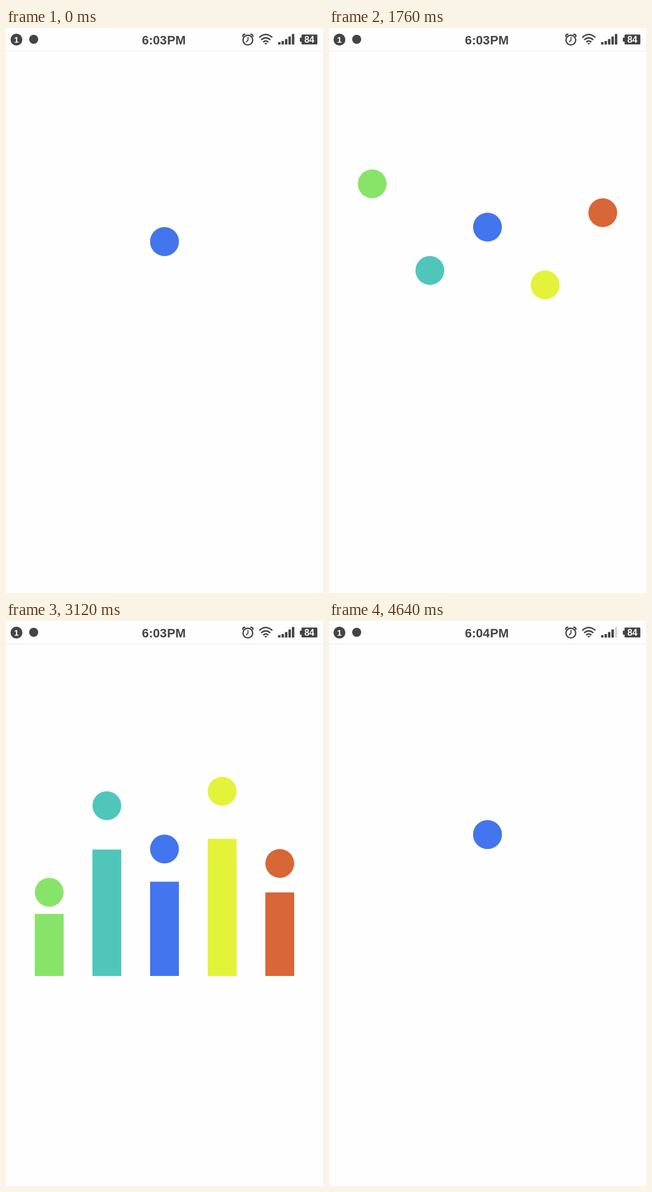
Recreate the animation shown at these times as an HTML page. Size 561 by 998 pixels, loop 4.72 s.

```html
<!DOCTYPE html>
<html lang="en">
<head>
<meta charset="utf-8">
<style>
  html, body { margin: 0; width: 100%; height: 100%; overflow: hidden; background: #fefefe; }
  svg { display: block; width: 561px; height: 998px; }
  text { font-family: "Liberation Sans", Arial, sans-serif; font-weight: bold; }
  .ink { fill: #444; }
  .line { fill: none; stroke: #444; stroke-width: 2.4; stroke-linecap: round; }
</style>
</head>
<body>
<svg viewBox="0 0 561 998">
  <rect y="40" width="561" height="1" fill="#ebebeb"/>

  <circle class="ink" cx="18.5" cy="20.5" r="10.5"/>
  <text x="18.3" y="26" font-size="15" fill="#fff" text-anchor="middle">1</text>
  <circle class="ink" cx="49" cy="20" r="8"/>

  <text id="clock" class="ink" x="240.5" y="28.5" font-size="22">6:03</text>
  <text class="ink" x="285" y="28.5" font-size="22">PM</text>

  <g class="line">
    <circle cx="428" cy="21.3" r="8.6"/>
    <path d="M419 14.5Q419 11.5 422.5 11M437 14.5Q437 11.5 433.5 11"/>
    <path d="M428.3 16.5V21.5L425.3 24.5" stroke-width="1.8"/>
    <path d="M449 16Q459.500 7 470.500 16M452.500 20.300Q459.500 14.500 467 20.300M456 24.300Q459.500 21.500 463.500 24.300" stroke-width="2.6"/>
  </g>
  <path class="ink" d="M456.800 26.500H462.800L459.800 29.500Z"/>
  <g id="signal"></g>

  <rect class="ink" x="523" y="11.500" width="28" height="17.500" rx="1.500"/>
  <rect class="ink" x="520" y="17" width="4" height="7" rx="1"/>
  <text id="charge" x="536.800" y="26" font-size="16" fill="#fff" text-anchor="middle">84</text>

  <g id="chart"></g>
</svg>
<script>
const LOOP = 4720, STEP = 80;
const CX = 280.5, CY = 377.3, R = 25.5, FLOOR = 627, GAP = 102;

// column (from the centre), level (in radii) and colour, back to front
const DOTS = [
  [-2, -4, '#88e468'],
  [2, -2, '#d86636'],
  [-1, 2, '#50c6ba'],
  [1, 3, '#e2f33a'],
  [0, -1, '#4275ee'],
];

const byId = id => document.getElementById(id);

function add(parent, tag, attrs) {
  const el = document.createElementNS('http://www.w3.org/2000/svg', tag);
  set(el, attrs);
  return parent.appendChild(el);
}

function set(el, attrs) {
  for (const key in attrs) el.setAttribute(key, attrs[key]);
}

const bars = [25, 23, 19.5, 15, 10.5].map((y, i) =>
  add(byId('signal'), 'rect', { x: 481.5 + i * 6.1, y, width: 4.3, height: 29.2 - y, fill: '#444' }));

const dots = DOTS.map(([col, level, fill]) => ({
  col, level,
  bar: add(byId('chart'), 'rect', { width: 2 * R, fill }),
  dot: add(byId('chart'), 'circle', { fill }),
}));

// eased progress from 0 to 1 between two times
function ease(t, from, to) {
  const p = Math.min(1, Math.max(0, (t - from) / (to - from)));
  return (1 - Math.cos(Math.PI * p)) / 2;
}

// rise and fall with the peak halfway
function swell(t, from, to) {
  const mid = (from + to) / 2;
  return ease(t, from, mid) - ease(t, mid, to);
}

// the charge label dims briefly now and then
function chargeOpacity(t) {
  const dim = [1125, 2020, 2980, 3960].map(c => 1 - Math.abs(t - c) / 110);
  return 1 - Math.max(0, ...dim);
}

function draw(t) {
  const gather = 1 - ease(t, 3485, 4025);
  const spread = GAP * ease(t, 17, 557) * gather;
  const lift = R * (ease(t, 630, 1170) - 2 * ease(t, 2310, 2850)) * gather;
  const grow = 0.745 * swell(t, 2862, 3360);
  const pulse = 1 + 2 * swell(t, 4100, 4640);

  for (const { col, level, bar, dot } of dots) {
    const x = CX + col * spread;
    const y = CY + level * lift;
    const height = (FLOOR - y) * grow;
    set(dot, { cx: x, cy: y, r: col ? R : R * pulse });
    set(bar, { x: x - R, y: FLOOR - height, height });
  }

  set(byId('charge'), { opacity: chargeOpacity(t) });
  set(bars[4], { fill: t < 3680 ? '#444' : '#d6d6d6' });
  byId('clock').textContent = t < 4240 ? '6:03' : '6:04';
}

const start = performance.now();

function tick() {
  const t = (performance.now() - start) % LOOP;
  draw(Math.floor(t / STEP) * STEP);
  requestAnimationFrame(tick);
}

tick();
</script>
</body>
</html>
```
